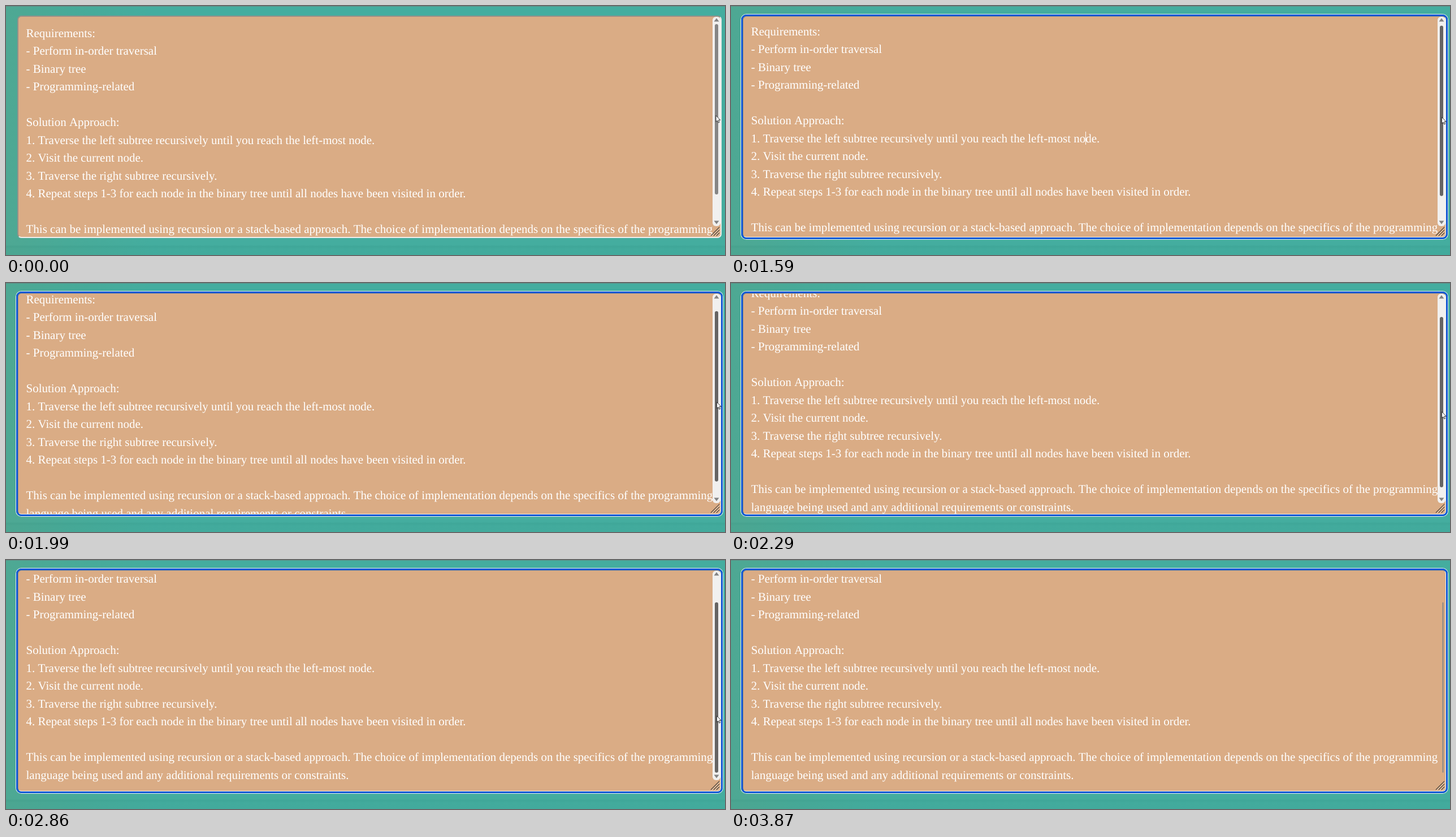
An HTML page that plays this animation: 1272 by 440 pixels, repeating every 4.15 s.

```html
<!DOCTYPE html>
<html lang="en">
<head>
<meta charset="utf-8">
<title>Scrolling a text area</title>
<style>
  html, body { margin: 0; width: 100%; height: 100%; overflow: hidden; }
  #stage {
    position: relative; width: 1272px; height: 440px; overflow: hidden;
    background: linear-gradient(90deg, #4ea893 0, #48aa98 110px, #44ad9f 260px);
  }
  #stage div, svg { position: absolute; box-sizing: border-box; }
  #topline { left: 0; top: 0; width: 1272px; height: 1px; background: #5f8a83; }
  #floor {
    left: 0; top: 422px; width: 1272px; height: 18px;
    background: linear-gradient(rgba(20, 110, 95, 0), rgba(20, 110, 95, .1) 3px, rgba(20, 110, 95, .04) 7px);
  }
  #box {
    left: 20px; top: 17px; width: 1246px; height: 393px;
    background: #daac85; border: 2px solid; border-radius: 7px;
    border-color: #959089 #eeeeec #eeeeec #959089;
  }
  /* The focus ring covers the outer pixel of the border. */
  #box.focus::after {
    content: ""; position: absolute; inset: -4px;
    border: 3px solid #1058d4; border-radius: 9px;
    box-shadow: 0 0 0 1px #e8f3f1;
  }
  svg { left: 0; top: 0; }
  text {
    font: 21px "Liberation Serif", "Times New Roman", serif;
    fill: #fff; text-rendering: geometricPrecision;
  }
</style>
</head>
<body>
<div id="stage">
  <div id="topline"></div>
  <div id="floor"></div>
  <div id="box"></div>
  <svg width="1272" height="440" viewBox="0 0 1272 440">
    <clipPath id="view"><rect x="22" y="19" width="1242" height="389" rx="5"/></clipPath>
    <g clip-path="url(#view)">
      <g id="content"><rect id="caret" x="627" y="225" width="1" height="23" fill="#fff"/></g>
    </g>
    <g fill="none" stroke-width="1.2">
      <path d="M1248 407L1263 392M1253 407L1263 397M1258 407L1263 402" stroke="#e9cdb2"/>
      <path d="M1247 406L1262 391M1252 406L1262 396M1257 406L1262 401" stroke="#4a3f36"/>
    </g>
    <g id="bar">
      <rect x="1250" y="19" width="14" height="370" rx="6" fill="#f1f0ef"/>
      <path d="M1252.5 27.5L1257 21.5L1261.5 27.5ZM1252.5 379.5L1257 385.5L1261.5 379.5Z" fill="#838383"/>
    </g>
    <rect id="thumb" height="301"/>
    <path id="cursor" d="M.5 .5V11.6L3 9.3L4.8 13.2L6.6 12.4L4.9 8.6H8.2Z"
      fill="#fff" stroke="#222" stroke-width=".9" stroke-linejoin="round"/>
  </svg>
</div>
<script>
const LOOP = 4150, FOCUS = 1300, DRAG = 1418, STEP = 143;
const RELEASE = 11, LEAVE = 14;
const BLINKS = [[FOCUS, 1860], [2450, 2860], [3440, 3870]];
const FONT = 21, PITCH = FONT * 1.5, SPACE = FONT / 4;

const LINES = [
  "Requirements:",
  "- Perform in-order traversal",
  "- Binary tree",
  "- Programming-related",
  "",
  "Solution Approach:",
  "1. Traverse the left subtree recursively until you reach the left-most node.",
  "2. Visit the current node.",
  "3. Traverse the right subtree recursively.",
  "4. Repeat steps 1-3 for each node in the binary tree until all nodes have been visited in order.",
  "",
  "This can be implemented using recursion or a stack-based approach. The choice of implementation depends on the specifics of the programming",
  "language being used and any additional requirements or constraints."
];

// Key points of the drag: step, scroll, pointer y
const KEYS = [
  [0, 0, 193], [1, 3, 196], [4, 19, 210], [6, 30, 227], [7, 45, 241],
  [9, 45, 270], [10, 46, 275], [12, 46, 286], [13, 46, 338]
];

const el = id => document.getElementById(id);
const show = (id, on) => el(id).setAttribute("visibility", on ? "visible" : "hidden");
const move = (id, x, y) => el(id).setAttribute("transform", `translate(${x} ${y})`);

// Words are placed one by one so that spaces are never kerned.
function setLine(line, row) {
  let x = 35.5;
  for (const word of line.split(" ")) {
    const text = document.createElementNS("http://www.w3.org/2000/svg", "text");
    text.setAttribute("x", x);
    text.setAttribute("y", Math.floor(55 + PITCH * row));
    text.textContent = word;
    el("content").prepend(text);
    x += text.getComputedTextLength() + SPACE;
  }
}

function poseAt(step) {
  const i = KEYS.findIndex(key => key[0] >= step);
  if (i < 1) return KEYS.at(i).slice(1);
  const [a, b] = [KEYS[i - 1], KEYS[i]];
  const p = (step - a[0]) / (b[0] - a[0]);
  return [1, 2].map(n => Math.round(a[n] + (b[n] - a[n]) * p));
}

function draw(t) {
  const step = Math.floor((t - DRAG) / STEP);
  const [scroll, y] = poseAt(Math.max(0, step));
  const thin = step >= LEAVE;
  const pressed = t >= FOCUS && step < RELEASE;

  el("box").classList.toggle("focus", t >= FOCUS);
  move("content", 0, -scroll);
  move("cursor", step < 0 ? 1255.5 : 1257, y);
  show("caret", BLINKS.some(([on, off]) => t >= on && t < off));
  show("bar", !thin);
  show("cursor", !thin);

  const thumb = {
    x: thin ? 1258.5 : 1254,
    y: 32 + scroll * 0.93,
    width: thin ? 2 : 6,
    rx: thin ? 1 : 3,
    fill: pressed ? "#656463" : "#858585"
  };
  for (const key in thumb) el("thumb").setAttribute(key, thumb[key]);
}

LINES.forEach(setLine);
const start = performance.now();
function tick() {
  draw((performance.now() - start) % LOOP);
  requestAnimationFrame(tick);
}
draw(0);
requestAnimationFrame(tick);
</script>
</body>
</html>
```
